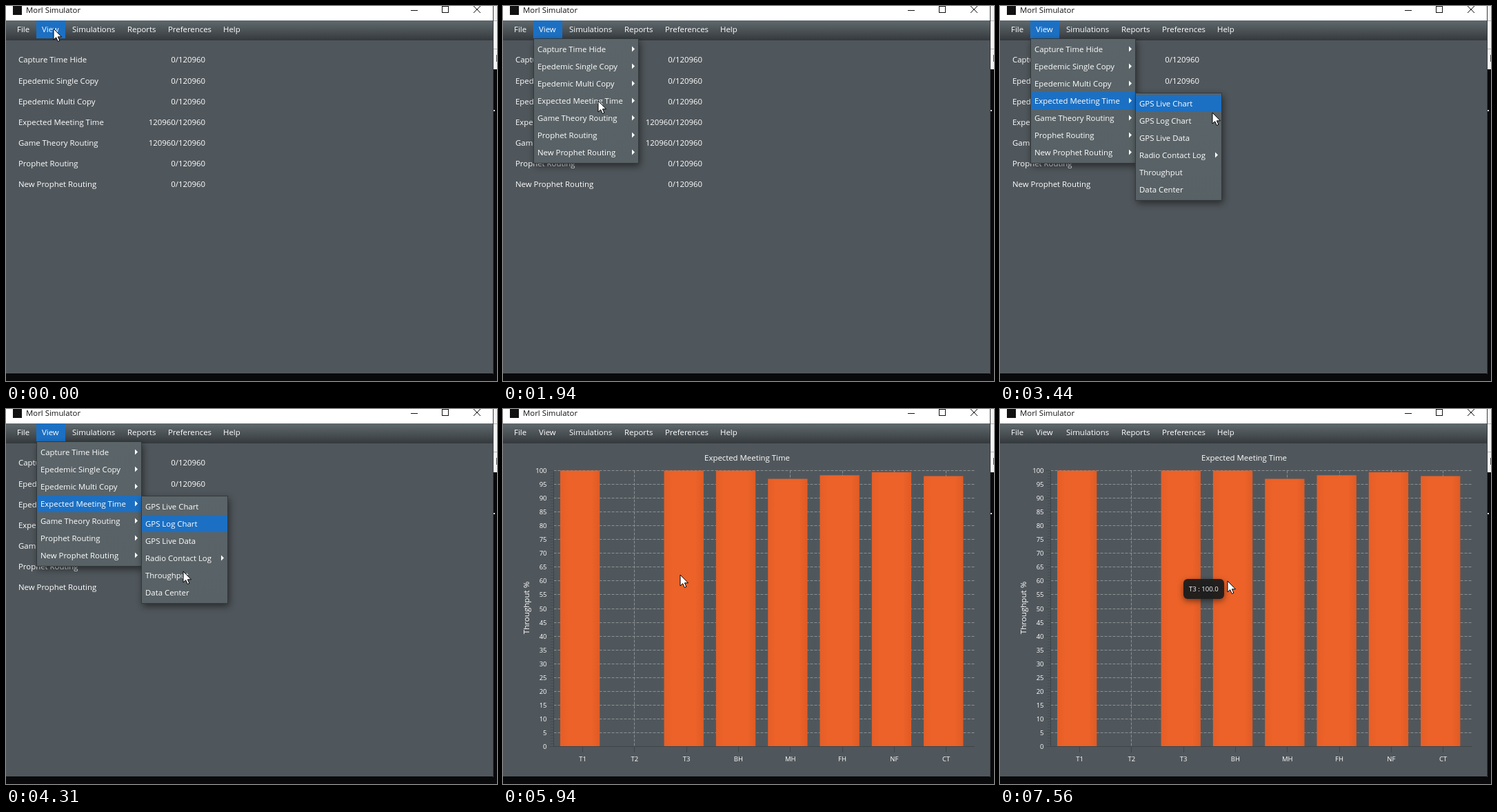
Recreate the animation shown at these times as an HTML page with a canvas. Size 712 px wide and 545 px high, loop 8000 ms.

```html
<!DOCTYPE html>
<html lang="en">
<head>
<meta charset="utf-8">
<title>Morl Simulator</title>
<style>
  html, body { margin: 0; width: 100%; height: 100%; overflow: hidden; background: #09090b; }
  canvas { display: block; }
</style>
</head>
<body>
<canvas id="stage" width="712" height="545"></canvas>
<script>
const ctx = document.getElementById('stage').getContext('2d');
const LOOP = 8000, BLUE = '#1c70c3', BODY = '#50575c', CHART_AT = 5940;

const protocols = ['Capture Time Hide', 'Epedemic Single Copy', 'Epedemic Multi Copy',
  'Expected Meeting Time', 'Game Theory Routing', 'Prophet Routing', 'New Prophet Routing'];
const finished = ['Expected Meeting Time', 'Game Theory Routing'];
const menuBar = [['File', 16], ['View', 52], ['Simulations', 96], ['Reports', 176],
  ['Preferences', 235], ['Help', 315]];
const bars = [['T1', 100], ['T2', 0], ['T3', 100], ['BH', 100],
  ['MH', 97], ['FH', 98.3], ['NF', 99.4], ['CT', 98]];

// Pointer stops: time, x, y
const pointer = [[0, 69, 33],
  [1630, 84, 50], [1730, 105, 85], [1840, 126, 120], [1940, 138, 138], [2130, 149, 139],
  [3310, 235, 144], [3440, 308, 155],
  [3630, 296, 162], [3730, 262, 185], [3840, 224, 210], [3940, 203, 224],
  [4130, 236, 231], [4250, 257, 236], [4500, 257, 240], [4750, 257, 241],
  [7380, 276, 270], [7500, 306, 290], [7560, 330, 250]];

function rect(x, y, w, h, fill) {
  ctx.fillStyle = fill;
  ctx.fillRect(x, y, w, h);
}

function text(s, x, y, { size = 11.4, fill = '#fff', align = 'left' } = {}) {
  ctx.font = `${size}px "Open Sans", "Noto Sans", sans-serif`;
  ctx.textAlign = align;
  ctx.fillStyle = fill;
  ctx.fillText(s, x, y);
}

function line(x1, y1, x2, y2, color) {
  ctx.strokeStyle = color;
  ctx.beginPath();
  ctx.moveTo(x1, y1);
  ctx.lineTo(x2, y2);
  ctx.stroke();
}

function polygon(points) {
  ctx.beginPath();
  points.forEach(([x, y]) => ctx.lineTo(x, y));
  ctx.closePath();
}

function shadow(color, blur, dx, dy) {
  ctx.shadowColor = color;
  ctx.shadowBlur = blur;
  ctx.shadowOffsetX = dx;
  ctx.shadowOffsetY = dy;
}

function gradient(x1, y1, x2, y2, colors) {
  const g = ctx.createLinearGradient(x1, y1, x2, y2);
  colors.forEach((c, i) => g.addColorStop(i / (colors.length - 1), c));
  return g;
}

function drawWindow(viewOpen) {
  rect(0, 0, 712, 545, '#09090b');
  rect(707, 0, 5, 92, '#f4f4f4');
  rect(707, 21, 5, 1, '#b8b8b8');
  rect(707, 62, 5, 1, '#b8b8b8');
  rect(711, 71, 1, 10, '#555');
  rect(707, 151, 2, 2, '#ddd');
  rect(0, 0, 706, 534, BODY);
  rect(706, 0, 1, 535, '#3a3d40');

  rect(0, 0, 706, 21, '#fff');
  rect(10, 0, 13, 13, '#111');
  text('Morl Simulator', 29, 10, { fill: '#111' });
  ctx.lineWidth = 1;
  line(587, 6.5, 597, 6.5, '#111');
  ctx.strokeRect(632.5, 0.5, 9, 9);
  line(678, 0, 688, 10, '#111');
  line(688, 0, 678, 10, '#111');

  rect(0, 21, 706, 29, gradient(0, 21, 0, 50, ['#5f696d', '#4b5256', '#34393d']));
  if (viewOpen) rect(44, 21, 42, 26, BLUE);
  menuBar.forEach(([name, x]) => text(name, x, 38));
}

function drawCounts() {
  protocols.forEach((name, i) => {
    const y = i ? 83 + 30 * i : 82;
    text(name, 18, y);
    text((finished.includes(name) ? 120960 : 0) + '/120960', 289, y, { align: 'right' });
  });
}

// Items ending in ">" open a further menu.
function drawMenu(x, y, w, items, active = -1) {
  const h = items.length * 25 + 7;
  shadow('rgba(0,0,0,.5)', 10, 2, 4);
  rect(x, y, w, h, '#33383b');
  shadow('transparent', 0, 0, 0);
  rect(x + 1, y + 1, w - 2, h - 2, gradient(0, y, 0, y + h, ['#5b6468', '#586165']));
  items.forEach((item, i) => {
    const top = y + 3 + 25 * i;
    if (i === active) rect(x + 1, top, w - 2, 25, BLUE);
    text(item.replace('>', ''), x + 6, top + 17);
    if (item.endsWith('>')) {
      const ax = x + w - 10, ay = top + 12.5;
      polygon([[ax, ay - 4], [ax + 4, ay], [ax, ay + 4]]);
      ctx.fillStyle = '#fff';
      ctx.fill();
    }
  });
}

function drawMenus(t) {
  if (t < 1060) return;
  const open = t < 2500 ? -1 : t < 2690 ? 0 : 3;
  drawMenu(44, 47, 153, protocols.map(p => p + '>'), open);
  if (open === 0) {
    drawMenu(196, 51, 126, ['GPS Live Chart', 'GPS Live data', 'Radio Contact Log>'], 0);
  } else if (open === 3) {
    const active = t < 4130 ? 0 : t < 4500 ? 1 : t < 5000 ? 3 : 4;
    drawMenu(196, 126, 126, ['GPS Live Chart', 'GPS Log Chart', 'GPS Live Data',
      'Radio Contact Log>', 'Throughput', 'Data Center'], active);
    if (active === 3) drawMenu(321, 204, 44, ['Chart', 'Data'], 0);
  }
}

function drawChart() {
  const left = 73.5, right = 684, base = 490.5;
  const yOf = v => base - v * 4.01;
  const centre = i => 115.5 + 75.3 * i;
  text('Expected Meeting Time', 354, 75, { align: 'center' });
  ctx.save();
  ctx.translate(38, 289);
  ctx.rotate(-Math.PI / 2);
  text('Throughput %', 0, 0, { size: 11.6, align: 'center' });
  ctx.restore();

  ctx.setLineDash([4, 2]);
  for (let v = 5; v <= 100; v += 5) {
    const y = Math.floor(yOf(v)) + 0.5;
    line(left, y, right, y, '#8b9093');
  }
  bars.forEach((b, i) => {
    const x = Math.floor(centre(i)) + 0.5;
    line(x, yOf(100), x, base, '#8b9093');
  });
  ctx.setLineDash([]);

  for (let v = 0; v <= 100; v++) {
    const y = Math.floor(yOf(v)) + 0.5;
    line(v % 5 ? 69 : 66, y, left, y, '#454c50');
    if (v % 5 === 0) text(v, 63.5, y + 3.5, { size: 9.5, align: 'right' });
  }
  line(left, yOf(100), left, base, '#3e4548');

  bars.forEach(([name, value], i) => {
    const x = 83 + 75.3 * i, top = yOf(value);
    const fill = gradient(x, 0, x + 57.3, 0,
      ['#e65e27', '#ec6228', '#ec6228', '#ec6228', '#ec6228', '#df5b25']);
    rect(x, top, 57.3, base - top, fill);
    const tick = Math.floor(centre(i)) + 0.5;
    line(tick, base, tick, 499, '#3e4548');
    text(name, centre(i), 512, { size: 9.5, align: 'center' });
  });
  line(left, base, right, base, '#3e4548');
}

function drawTooltip() {
  shadow('rgba(0,0,0,.5)', 9, 0, 3);
  ctx.fillStyle = 'rgba(30,30,30,.95)';
  ctx.beginPath();
  ctx.roundRect(266, 247, 59, 29, 6);
  ctx.fill();
  shadow('transparent', 0, 0, 0);
  text('T3 : 100.0', 274, 265, { size: 9.6 });
}

function drawPointer(t) {
  const [, x, y] = pointer.findLast(p => p[0] <= t);
  ctx.save();
  ctx.translate(x + 0.5, y + 0.5);
  polygon([[-0.5, -0.5], [-0.5, 15.5], [3.2, 12.2], [5.8, 18], [8.4, 16.8], [5.9, 11.3], [11, 11.3]]);
  ctx.fillStyle = '#fff';
  ctx.fill();
  ctx.strokeStyle = '#000';
  ctx.stroke();
  ctx.restore();
}

function frame(now) {
  const t = now % LOOP;
  const chart = t >= CHART_AT;
  drawWindow(!chart);
  if (chart) {
    drawChart();
    if (t >= 7250) drawTooltip();
  } else {
    drawCounts();
    drawMenus(t);
  }
  drawPointer(t);
}

const start = performance.now();
function tick() {
  frame(performance.now() - start);
  requestAnimationFrame(tick);
}
tick();
</script>
</body>
</html>
```
